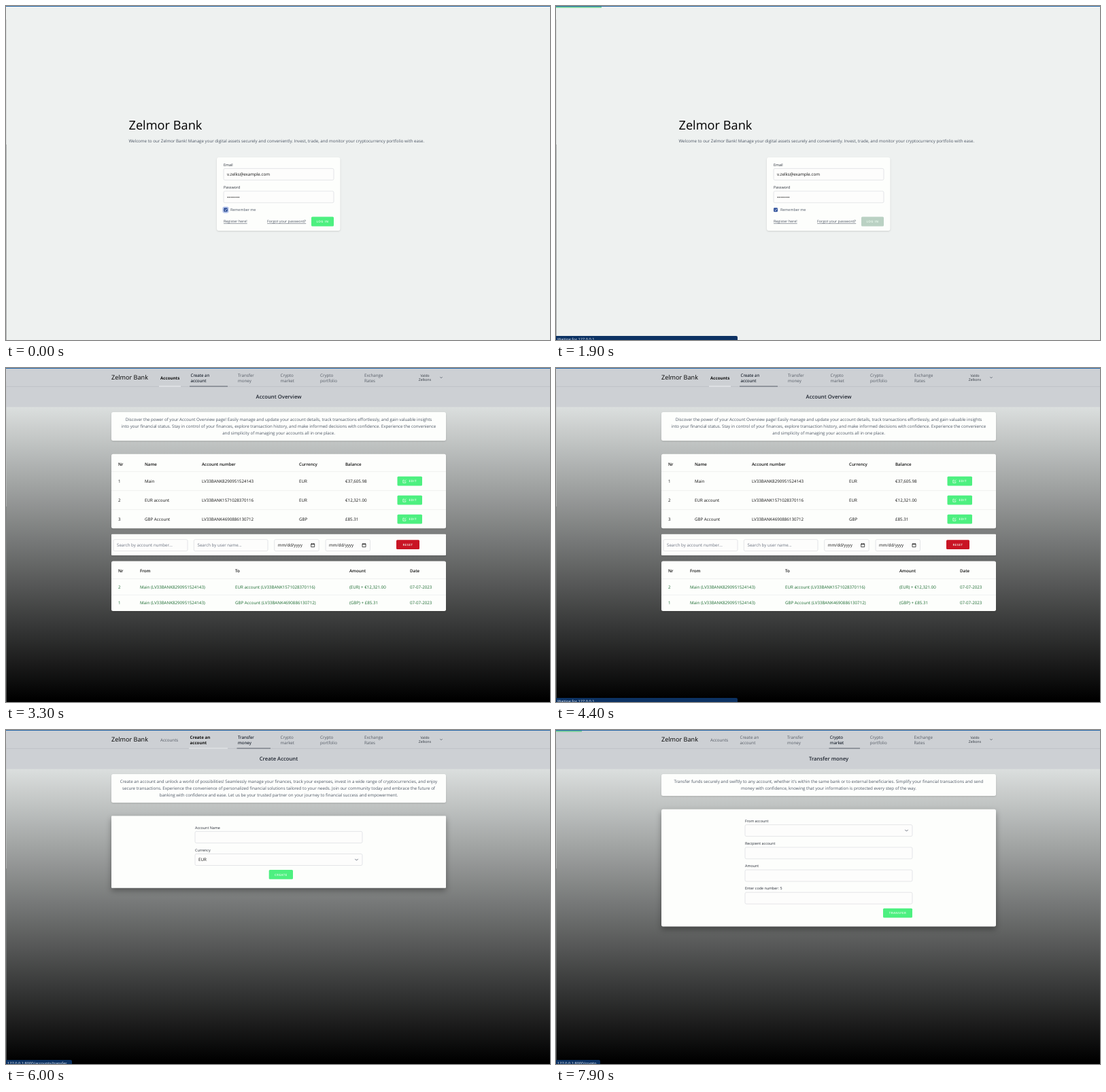
An HTML page that plays this animation: 800x492 px, repeating every 8000 ms.

```html
<!DOCTYPE html>
<html lang="en">
<head>
<meta charset="utf-8">
<title>Bank demo</title>
<style>
  html, body { margin: 0; width: 100%; height: 100%; overflow: hidden; background: #eef1f0; }
  svg { display: block; width: 100vw; height: 100vh; }
  text { font: 6.2px "Open Sans", "Noto Sans", sans-serif; text-rendering: geometricPrecision; fill: #111; }
  .mid { text-anchor: middle; }
  .brand { font-size: 9.1px; fill: #000; }
  .hero { font-size: 18.2px; fill: #000; }
  .soft { fill: #4b5563; }
  .hint { fill: #6b7280; }
  .small { font-size: 5.4px; fill: #4b5563; }
  .label { font-size: 5.4px; font-weight: 500; fill: #262c36; }
  .under { text-decoration: underline; }
  .head { font-weight: 600; }
  .title { font-size: 7.7px; font-weight: 600; fill: #1f2530; }
  .link { font-weight: 500; fill: #565c66; }
  .dark { fill: #2f3640; }
  .active { font-weight: 700; }
  .user { font-size: 5.1px; font-weight: 500; fill: #30363f; }
  .btn { font-size: 4.4px; font-weight: 600; letter-spacing: .5px; fill: #f0fff4; }
  .green { fill: #18692e; }
  .status { font-size: 5.7px; fill: #f2f5f9; }
  .card { fill: #fdfefc; filter: drop-shadow(0 1px 1px #0002); }
  .deep { filter: drop-shadow(0 4px 4px #0005); }
  .field { fill: #fdfdfc; stroke: #d3d6db; stroke-width: .6; }
  .icon { fill: none; stroke: #4b5563; stroke-width: .8; }
</style>
</head>
<body>
<svg id="stage" viewBox="0 0 800 492" preserveAspectRatio="none"></svg>
<script>
const LOOP = 8000, GREEN = '#4df080', BRAND = 'Zelmor Bank';

// y is the vertical middle of the text
const text = (x, y, s, cls = '') => `<text x="${x}" y="${y}" dy=".36em" class="${cls}">${s}</text>`;
const rect = (x, y, x2, y2, attrs = '') =>
  `<rect x="${x}" y="${y}" width="${x2 - x}" height="${y2 - y}" ${attrs}/>`;
const line = (x, x2, y, color, w = 1) => `<path d="M${x} ${y}H${x2}" stroke="${color}" stroke-width="${w}"/>`;
const card = (y, y2, r = 2.5, cls = '') => rect(155, y, 647, y2, `rx="${r}" class="card ${cls}"`);
const field = (x, y, x2) => rect(x, y, x2, y + 17, 'rx="2" class="field"');
const chevron = (x, y, r) => `<path class="icon" d="M${x - r} ${y - r / 2}l${r} ${r}l${r} ${-r}"/>`;
const button = (x, y, x2, s, fill = GREEN, shift = 0) =>
  rect(x, y, x2, y + 13.8, `rx="1.5" fill="${fill}"`) + text((x + x2) / 2 + shift, y + 7, s, 'btn mid');
const row = (xs, y, cells, cls) => cells.map((s, i) => text(xs[i], y, s, cls)).join('');
const on = (from, to, body) => `<g data-on="${from} ${to}">${body}</g>`;

const LINKS = [['Accounts'], ['Create an', 'account'], ['Transfer', 'money'],
  ['Crypto', 'market'], ['Crypto', 'portfolio'], ['Exchange', 'Rates']];

const link = (i, x, cls) => {
  const lines = LINKS[i], y = lines[1] ? 10.7 : 14.3;
  return lines.map((s, k) => text(x, y + 7.8 * k, s, cls)).join('');
};

function shell(title, xs, active, intro) {
  const spans = [[225, 257], [269, 326]];
  return rect(0, 0, 800, 492, 'fill="url(#fade)"') + rect(0, 0, 800, 57.5, 'fill="#cdd0d4"') +
    line(0, 800, 27.3, '#b9bcc1', .7) + text(155, 13.5, BRAND, 'brand') +
    xs.map((x, i) => link(i, x, i === active ? 'active' : 'link')).join('') +
    (spans[active] ? line(...spans[active], 27, '#eff1f3', 1.2) : '') +
    text(616, 11, 'Valdo', 'user mid') + text(616, 17.2, 'Zelkons', 'user mid') + chevron(640, 14, 1.6) +
    text(401, 42.3, title, 'title mid') +
    card(65, 77 + 10 * intro.length, 2.5) +
    intro.map((s, i) => text(401, 76.2 + 9.9 * i, s, 'soft mid')).join('');
}

const hover = (i, x, from, to, x1, x2) => on(from, to, link(i, x, 'link dark') + line(x1, x2, 27, '#5d636d', 1.1));

function login() {
  return rect(0, 0, 800, 492, 'fill="#eef1f0"') + text(180.5, 175, BRAND, 'hero') +
    text(180.5, 198.8, `Welcome to our ${BRAND}! Manage your digital assets securely and conveniently. ` +
      'Invest, trade, and monitor your cryptocurrency portfolio with ease.', 'soft') +
    rect(310, 223, 491.5, 331, 'rx="3" class="card"') +
    text(320, 233.6, 'Email', 'label') + field(320, 239.4, 482) + text(325, 248, 'v.zelks@example.com') +
    text(320, 267, 'Password', 'label') + field(320, 272.8, 482) + text(325, 281.3, '••••••••') +
    on(0, 1000, rect(318.9, 296.2, 327.1, 304.4, 'rx="2" fill="#fff" stroke="#93aae6" stroke-width="1"')) +
    rect(320, 297.2, 326, 303.3, 'rx="1.3" fill="#33549c"') +
    '<path d="M321.4 300.3l1.2 1.2l2.2-2.4" fill="none" stroke="#fff" stroke-width=".8"/>' +
    text(330, 300.2, 'Remember me', 'small') + text(320, 317.5, 'Register here!', 'small under') +
    text(384, 317.5, 'Forgot your password?', 'small under') +
    `<g id="login">${button(449, 310.6, 482, 'LOG IN', 'currentColor')}</g>`;
}

function overview() {
  const accounts = [165, 204, 288, 431, 499], moves = [165, 197, 337, 505, 594];
  const main = 'LV33BANK8290951524143', eur = 'LV33BANK1571028370116', gbp = 'LV33BANK4690886130712';
  const edit = y => button(575.5, y - 7, 612, 'EDIT', GREEN, 4.5) +
    `<path d="M586 ${y - 1.6}h-2.2v4h4v-2.2M585.4 ${y + .8}l3-3" fill="none" stroke="#f0fff4" stroke-width=".7"/>`;
  const date = x => field(x, 252.6, x + 65.5) + text(x + 5, 261, 'mm/dd/yyyy') +
    `<path class="icon" style="stroke:#222" d="M${x + 54} 259h5v4.6h-5zM${x + 54} 259.8h5M${x + 55} 258v1M${x + 58} 258v1"/>`;
  return shell('Account Overview', [227, 271.5, 341, 403.5, 462, 527], 0, [
      'Discover the power of your Account Overview page! Easily manage and update your account details, track transactions effortlessly, and gain valuable insights',
      'into your financial status. Stay in control of your finances, explore transaction history, and make informed decisions with confidence. Experience the convenience',
      'and simplicity of managing your accounts all in one place.']) +
    hover(1, 271.5, 3300, 4700, 270, 326) +
    card(126.7, 236.3) +
    row(accounts, 141.3, ['Nr', 'Name', 'Account number', 'Currency', 'Balance'], 'head') +
    [['1', 'Main', main, 'EUR', '€37,605.98'], ['2', 'EUR account', eur, 'EUR', '€12,321.00'],
      ['3', 'GBP Account', gbp, 'GBP', '£85.31']].map((cells, i) => {
      const y = 166.8 + 28 * i;
      return line(155, 647, y - 14.2, '#e6e8ea', .6) + row(accounts, y, cells) + edit(y);
    }).join('') +
    card(244.7, 276, 1) + field(158, 252.6, 267) + text(163, 261, 'Search by account number...', 'hint') +
    field(276.3, 252.6, 385) + text(281.5, 261, 'Search by user name...', 'hint') + date(394.7) + date(470) +
    button(574, 253.3, 608, 'RESET', '#c91424') +
    card(284.6, 358) + row(moves, 299, ['Nr', 'From', 'To', 'Amount', 'Date'], 'head') +
    line(155, 647, 310.5, '#e6e8ea', .6) + line(155, 647, 334.3, '#e6e8ea', .6) +
    row(moves, 322.4, ['2', `Main (${main})`, `EUR account (${eur})`, '(EUR) + €12,321.00', '07-07-2023'], 'green') +
    row(moves, 346.2, ['1', `Main (${main})`, `GBP Account (${gbp})`, '(GBP) + £85.31', '07-07-2023'], 'green');
}

function create() {
  return shell('Create Account', [227, 270.5, 341, 403.5, 462, 527], 1, [
      'Create an account and unlock a world of possibilities! Seamlessly manage your finances, track your expenses, invest in a wide range of cryptocurrencies, and enjoy',
      'secure transactions. Experience the convenience of personalized financial solutions tailored to your needs. Join our community today and embrace the future of',
      'banking with confidence and ease. Let us be your trusted partner on your journey to financial success and empowerment.']) +
    hover(2, 341, 4900, 6200, 339.5, 389) +
    card(126.5, 232.8, 1, 'deep') + text(278, 143.6, 'Account Name', 'label') + field(278, 149.4, 524) +
    on(4700, 5800, rect(278, 149.4, 524, 166.4, 'rx="2" fill="#fff" stroke="#93a5e2" stroke-width="1.1"')) +
    on(4700, 5200, rect(283, 153.8, 283.7, 161.6)) + on(5600, 5800, rect(283, 153.8, 283.7, 161.6)) +
    text(278, 176.8, 'Currency', 'label') + field(278, 182.5, 524) + text(283, 191, 'EUR') +
    chevron(515.5, 191, 2.2) + button(386.7, 206, 422, 'CREATE');
}

function transfer() {
  return shell('Transfer money', [227, 270.5, 340, 402.7, 461.7, 526.5], -1, [
      "Transfer funds securely and swiftly to any account, whether it's within the same bank or to external beneficiaries. Simplify your financial transactions and send",
      'money with confidence, knowing that your information is protected every step of the way.']) +
    hover(3, 402.7, 6500, LOOP, 401.5, 447) +
    card(116.8, 289.4, 2.5, 'deep') +
    ['From account', 'Recipient account', 'Amount', 'Enter code number: 5'].map((s, i) =>
      text(278, 133.8 + 33.2 * i, s, 'label') + field(278, 139.6 + 33.2 * i, 524)).join('') +
    chevron(515.5, 148, 2.2) + button(481, 262.8, 524, 'TRANSFER');
}

const status = (from, to, s, w) => on(from, to,
  `<path d="M0 486H${w - 2}q2 0 2 2V492H0z" fill="#0c3263"/>` + text(2, 490.6, s, 'status'));
const HOST = '127.0.0.1', URL_BASE = HOST + ':8000/', WAIT = `Waiting for ${HOST}…`;

const stage = document.getElementById('stage');
stage.innerHTML =
  `<defs><linearGradient id="fade" gradientUnits="userSpaceOnUse" x1="0" y1="28" x2="0" y2="488" >
    <stop stop-color="#eaeeed"/><stop offset="1" stop-color="#000"/></linearGradient></defs>` +
  on(0, 2000, login()) + on(2000, 4700, overview()) + on(4700, 6200, create()) + on(6200, LOOP, transfer()) +
  rect(0, 20, .5, 204, 'fill="#c2c5c5"') + rect(0, 204, .6, 492, 'fill="#808484"') +
  rect(0, 0, 800, 1, 'fill="#2767a8"') +
  '<rect id="bar" y="1.1" height="1.5" fill="#63cf8e"/>' +
  status(1900, 2300, WAIT, 267) + status(3500, 4300, URL_BASE + 'accounts/create', 92) +
  status(4300, 4700, WAIT, 267) + status(4700, 6500, URL_BASE + 'accounts/transfer', 97) +
  status(6500, 6800, URL_BASE + 'crypto', 97) + status(6800, LOOP, URL_BASE + 'crypto', 65);

const bar = document.getElementById('bar'), loginButton = document.getElementById('login');
const timed = [...stage.querySelectorAll('[data-on]')].map(el => [el, ...el.dataset.on.split(' ').map(Number)]);
const RUNS = [
  [[1000, 0], [1700, 62], [1900, 64], [2000, 365], [2150, 800], [2400, 800]],
  [[4700, 60], [4800, 217], [5000, 800], [5200, 800]],
  [[7500, 0], [7600, 30], [7900, 38], [LOOP, 42]]
];
const clamp = v => Math.max(0, Math.min(1, v));

function barWidth(t) {
  for (const run of RUNS)
    for (let i = 1; i < run.length; i++) {
      const [a, va] = run[i - 1], [b, vb] = run[i];
      if (t >= a && t < b) return va + (vb - va) * (t - a) / (b - a);
    }
  return 0;
}

function draw() {
  const t = performance.now() % LOOP;
  for (const [el, from, to] of timed) el.style.display = t >= from && t < to ? '' : 'none';
  bar.setAttribute('width', barWidth(t));
  bar.style.opacity = t < 2600 ? clamp((2400 - t) / 250) : t < 5600 ? clamp((5200 - t) / 200) : 1;
  const k = clamp((t - 200) / 150), mix = (a, b) => Math.round(a + (b - a) * k);
  loginButton.style.color = `rgb(${mix(77, 186)},${mix(240, 209)},${mix(128, 195)})`;
  requestAnimationFrame(draw);
}
draw();
</script>
</body>
</html>
```
